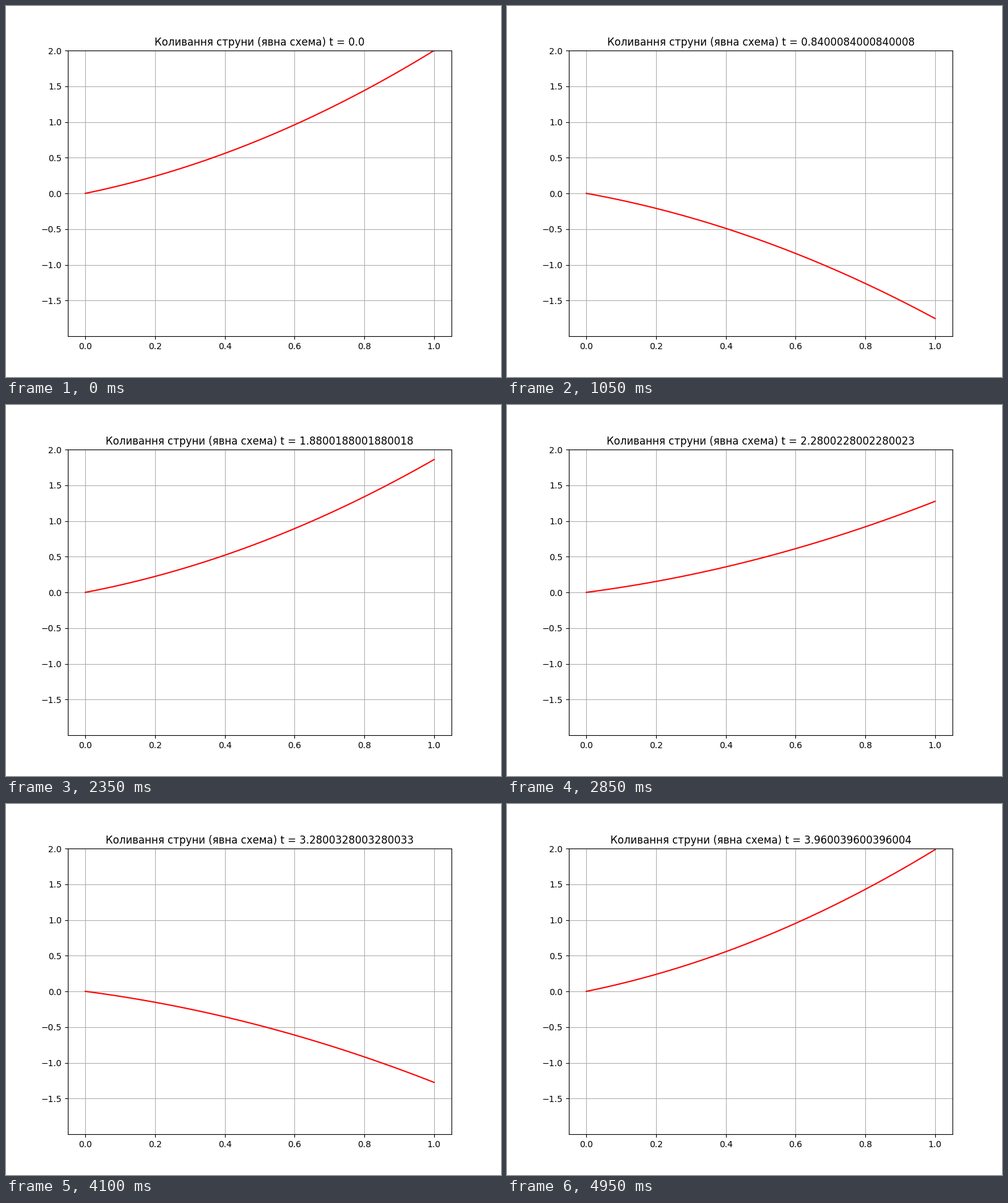
A matplotlib script for the animation above (5000 ms loop, 800 by 600 pixels).

```python
import numpy as np
import matplotlib.pyplot as plt
from matplotlib.animation import FuncAnimation

FRAMES = 100
STRIDE = 1000

x = np.linspace(0, 1, 101)
times = np.linspace(0, 4, FRAMES * STRIDE)


def string_shape(t):
    """Standing wave with a fixed left end."""
    return x * (x + 1) * np.cos(np.pi * t)


fig, ax = plt.subplots(figsize=(8, 6), dpi=100)
line, = ax.plot(x, string_shape(0), color="red")
# The lower limit sits just above -2, so that tick is left out.
ax.set_ylim(-2 + 1e-8, 2)
ax.grid()


def update(i):
    t = times[i * STRIDE]
    line.set_ydata(string_shape(t))
    ax.set_title(f"Коливання струни (явна схема) t = {t}")
    return line,


anim = FuncAnimation(fig, update, frames=FRAMES, interval=50,
                     repeat=True, repeat_delay=0)
plt.show()
```
